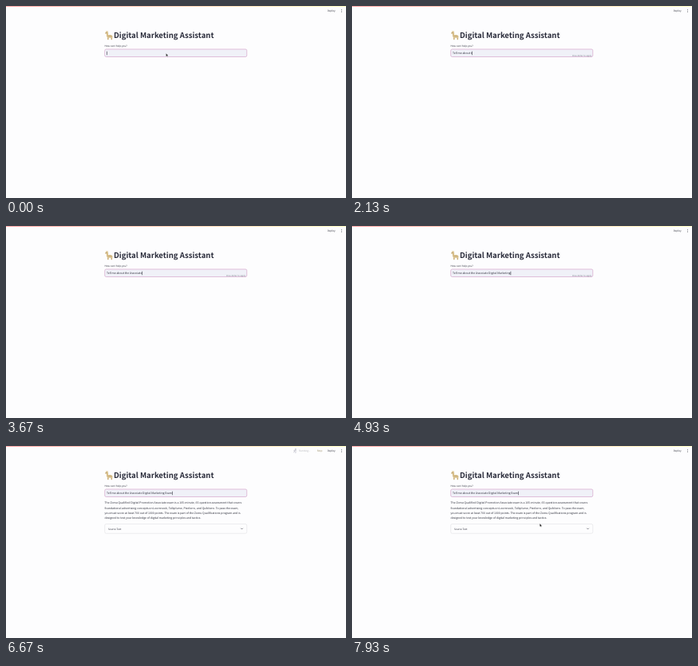
Animation of 426x240 px, one loop 8 s. Source, as an HTML page:

```html
<!DOCTYPE html>
<html lang="en">
<head>
<title>Digital Marketing Assistant</title>
<style>
  html, body { margin: 0; width: 100%; height: 100%; overflow: hidden; background: #fdfdfe; }
  svg { display: block; width: 100vw; height: 100vh; }
  text {
    font-family: "Noto Sans CJK JP", "Noto Sans CJK SC", "Noto Sans CJK", "Open Sans", sans-serif;
    fill: #31333f; white-space: pre; text-rendering: geometricPrecision;
  }
  .title { font-size: 38.2px; font-weight: 700; fill: #2a2c3b; }
  .label { font-size: 12.2px; }
  .body { font-size: 13.9px; }
  .hint { font-size: 10.4px; fill: #7d7f8a; text-anchor: end; }
</style>
</head>
<body>
<svg viewBox="0 0 1704 960">
  <defs>
    <linearGradient id="bar"><stop stop-color="#ff6b6b"/><stop offset="1" stop-color="#fffd9a"/></linearGradient>
  </defs>
  <rect width="1704" height="2.4" fill="url(#bar)"/>

  <g id="status">
    <g fill="none" stroke="#aaaab8" stroke-width="2" stroke-linecap="round">
      <circle cx="1451" cy="16" r="2"/>
      <path d="M1450 20L1447 27M1442 23L1449 20L1456 24"/>
      <path id="legs"/>
    </g>
    <text class="label" x="1468" y="29" opacity=".35">Running...</text>
    <text class="label" x="1559" y="29" style="fill:#96895f">Stop</text>
  </g>
  <text class="label" x="1611" y="29">Deploy</text>
  <g fill="#31333f"><circle cx="1682" cy="18" r="1.8"/><circle cx="1682" cy="24" r="1.8"/><circle cx="1682" cy="30" r="1.8"/></g>

  <g transform="translate(494 121)">
    <path fill="#d9c08c" d="M6 11L9 2L12 7L15 2L17 9Q20 13 18 24Q31 21 38 27Q42 31 39 37L38 48H33L32 38H21L20 48H15L14 37Q9 32 9 18L2 17Q1 12 6 11Z"/>
    <path fill="none" stroke="#b39a68" stroke-width="2" d="M17 28Q26 33 36 29M17 39V47M35 39V47"/>
    <circle cx="9" cy="12" r="1.5" fill="#4d4033"/>
  </g>
  <text class="title" x="540" y="159">Digital Marketing Assistant</text>
  <text class="label" x="494" y="203">How can I help you?</text>

  <rect x="495" y="216" width="712" height="38" rx="7" fill="#f0f1f8" stroke="#d199c4" stroke-width="2.4"/>
  <text class="body" id="query" x="504" y="240.5"></text>
  <rect id="caret" y="227" width="2.4" height="18" fill="#31333f"/>
  <text class="hint" id="hint" x="1200" y="250.5">Press Enter to apply</text>

  <g id="answer">
    <g id="lines"></g>
    <rect x="495" y="390" width="712" height="47" rx="7" fill="none" stroke="#d6d6dc" stroke-width="1.8"/>
    <text class="label" x="512" y="418">Source Text</text>
    <path d="M1177 411L1182 416L1187 411" fill="none" stroke="#31333f" stroke-width="2.4"/>
  </g>

  <path id="pointer" d="M0 0V15L3.6 11.8L6.2 17L9 15.6L6.6 10.6H11Z" fill="#111" stroke="#fff" stroke-width="1.2"/>
</svg>
<script>
const LOOP = 8000;
const QUERY = "Tell me about the Associate Digital Marketing Exam";
const ANSWER = [
  "The Zomu Qualified Digital Promotion Associate exam is a 105-minute, 65-question assessment that covers",
  "foundational advertising concepts on Loomnook, Talkplume, Pixelorro, and Quibbero. To pass the exam,",
  "you must score at least 700 out of 1000 points. The exam is part of the Zomu Qualifications program and is",
  "designed to test your knowledge of digital marketing principles and tactics."
];
// [time, characters typed]
const TYPING = [[0, 0], [400, 0], [930, 4.4], [2130, 15.3], [3670, 27.4], [4930, 45.4], [5330, 50], [LOOP, 50]];
const TYPE_START = 530, SUBMIT = 5470, ANSWER_AT = 6400, DONE = 6870;
const MOVE = { start: 7000, end: 7750, from: [802, 237], to: [941, 388] };

const el = id => document.getElementById(id);
const [query, caret, hint, answer, status_, legs, pointer] =
  ["query", "caret", "hint", "answer", "status", "legs", "pointer"].map(el);

ANSWER.forEach((line, i) => {
  const text = query.cloneNode();
  text.removeAttribute("id");
  text.setAttribute("x", 494);
  text.setAttribute("y", 289.5 + i * 24.9);
  text.textContent = line;
  el("lines").append(text);
});

const show = (node, on) => node.setAttribute("visibility", on ? "visible" : "hidden");
const between = (t, a, b) => t >= a && t < b;

function typedAt(t) {
  const i = TYPING.findIndex(([time]) => time > t);
  const [t0, n0] = TYPING[i - 1], [t1, n1] = TYPING[i];
  return Math.floor(n0 + (n1 - n0) * (t - t0) / (t1 - t0));
}

function draw(t) {
  const typed = QUERY.slice(0, typedAt(t));
  if (query.textContent !== typed) query.textContent = typed;
  caret.setAttribute("x", 504.5 + (typed ? query.getComputedTextLength() : 0));
  show(caret, t < SUBMIT || Math.floor((t - SUBMIT) / 500) % 2 === 0);
  show(hint, typed && t < SUBMIT);
  show(answer, t >= ANSWER_AT);
  show(status_, between(t, SUBMIT + 130, DONE));
  legs.setAttribute("d", Math.floor(t / 200) % 2
    ? "M1447 27L1453 30L1451 35M1447 27L1441 32" : "M1447 27L1449 35M1447 27L1444 34");

  const p = Math.min(1, Math.max(0, (t - MOVE.start) / (MOVE.end - MOVE.start)));
  const ease = p * p * (3 - 2 * p);
  const [x, y] = MOVE.from.map((v, i) => v + (MOVE.to[i] - v) * ease);
  pointer.setAttribute("transform", `translate(${x} ${y})`);
  show(pointer, t < TYPE_START || t >= MOVE.start);
}

const begin = performance.now();
function tick() {
  draw((performance.now() - begin) % LOOP);
  requestAnimationFrame(tick);
}
tick();
</script>
</body>
</html>
```
